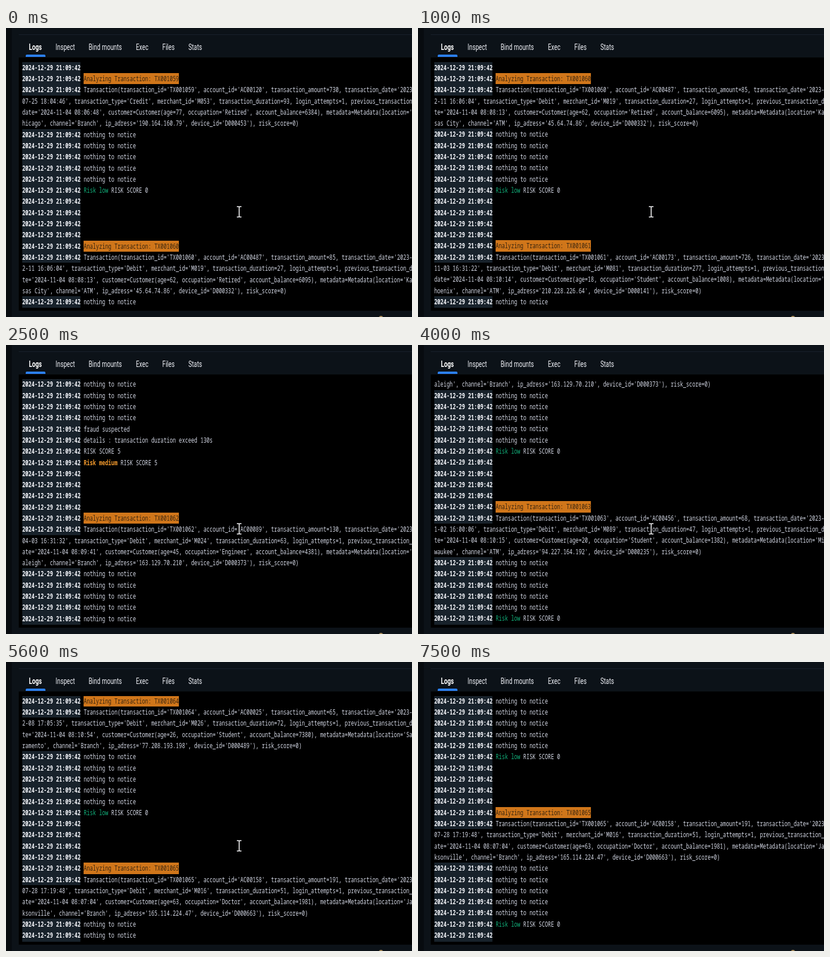
These frames come from a looping animation (700 by 500 pixels, 7.6 s). An HTML page:

```html
<!DOCTYPE html>
<html lang="en">
<head>
<meta charset="utf-8">
<title>Container logs</title>
<style>
  html, body { margin: 0; width: 100%; height: 100%; overflow: hidden; background: #0c1218; }
  #stage { position: relative; width: 700px; height: 500px; overflow: hidden; background: #0c1218; }
  #stage > * { position: absolute; }
  .edge { left: 0; top: 0; width: 10px; height: 500px; background: #070b0f; }
  .rule { left: 22px; top: 11px; width: 678px; height: 1px; background: #18212b; }
  .pane { left: 22px; top: 51px; width: 678px; height: 438px; background: #000; }
  .mark { left: 33.5px; top: 46px; width: 34.5px; height: 4px; border-radius: 2px 2px 0 0; background: #2c80f4; }
  .dot { left: 643px; top: 498px; width: 7px; height: 6px; border-radius: 50%; background: #a88c58; }

  /* The whole interface is shown horizontally condensed */
  #ui { --sx: .679; left: 0; top: 0; width: calc(700px / var(--sx)); height: 500px;
        transform: scaleX(var(--sx)); transform-origin: 0 0; }
  #ui > * { position: absolute; }
  .tab { top: 23px; left: calc(var(--x) * 1px / var(--sx)); white-space: pre;
         font: 400 15px/20px Roboto, sans-serif; color: #f0f2f8; }
  .tab.on { font-weight: 600; color: #fff; }
  #view { left: calc(28px / var(--sx)); top: 58.9px; width: calc(672px / var(--sx)); height: 424.82px; overflow: hidden; }
  #log { position: relative; font: 500 13px/19.31px "Noto Sans Mono", monospace; color: #d3d7e4; }
  .row { height: 19.31px; white-space: pre; }
  .row span { display: inline-block; height: 19.31px; vertical-align: top; }
  .row .time { background: #18222b; color: #f8f9fe; font-weight: 600; }
  .row .head { background: #d0761a; color: #35230f; }
  .low { color: #12b27c; }
  .medium { color: #f0982c; font-weight: 600; }
  #beam { left: 396px; top: 306px; }
</style>
</head>
<body>
<div id="stage">
  <div class="edge"></div>
  <div class="rule"></div>
  <div class="pane"></div>
  <div class="mark"></div>
  <div class="dot"></div>
  <div id="ui">
    <div class="tab on" style="--x:39.5">Logs</div>
    <div class="tab" style="--x:85.5">Inspect</div>
    <div class="tab" style="--x:142.5">Bind mounts</div>
    <div class="tab" style="--x:224">Exec</div>
    <div class="tab" style="--x:269.5">Files</div>
    <div class="tab" style="--x:314.5">Stats</div>
    <div id="view"><div id="log"></div></div>
  </div>
  <svg id="beam" width="12" height="24" fill="none">
    <defs><path id="bar" d="M2 3H5L6 4L7 3H10M6 4V20M2 21H5L6 20L7 21H10"/></defs>
    <use href="#bar" stroke="#000" stroke-width="3.6"/>
    <use href="#bar" stroke="#f4f4f6" stroke-width="1.6"/>
  </svg>
</div>
<script>
  const LOOP = 7600, STEP = 100, COLS = 128, VISIBLE = 22, LINE = 19.31;
  const BEAM_END = 6500;
  const STAMP = '2024-12-29 21:09:42';

  // account | amount | date | type | merchant | duration | previous | age | job | balance | city | channel | ip | device
  const records = [
    'AC00120|730|2023-07-25 18:04:46|Credit|M053|93|08:06:48|77|Retired|6384|Chicago|Branch|190.164.160.79|D000453',
    'AC00487|85|2023-12-11 16:06:04|Debit|M019|27|08:08:13|62|Retired|6095|Kansas City|ATM|45.64.74.86|D000332',
    'AC00173|726|2023-11-03 16:31:22|Debit|M081|277|08:10:14|18|Student|1008|Phoenix|ATM|210.228.226.64|D000141',
    'AC00089|130|2023-04-03 16:31:32|Debit|M024|63|08:09:41|45|Engineer|4381|Raleigh|Branch|163.129.70.210|D000373',
    'AC00456|68|2023-11-02 16:00:06|Debit|M089|47|08:10:15|20|Student|1382|Milwaukee|ATM|94.227.164.192|D000235',
    'AC00025|65|2023-12-08 17:05:35|Debit|M026|72|08:10:54|26|Student|7380|Sacramento|Branch|77.208.193.198|D000489',
    'AC00158|191|2023-07-28 17:19:48|Debit|M016|51|08:07:04|63|Doctor|1981|Jacksonville|Branch|165.114.224.47|D000663'
  ];

  // Rows written so far at given times
  const progress = [[0, 22], [1000, 37], [2500, 58], [4000, 74], [4700, 89], [5600, 100], [6400, 105]];

  const rows = [];
  const time = `<span class="time">${STAMP}</span> `;
  const tag = (cls, text) => `<span class="${cls}">${text}</span>`;
  const put = html => rows.push({ html: time + html, whole: true });

  function putWrapped(text) {
    const full = `${STAMP} ${text}`;
    for (let i = 0; i < full.length; i += COLS) {
      const part = full.slice(i, i + COLS);
      rows.push({
        html: i ? part : time + part.slice(STAMP.length + 1),
        whole: i + COLS >= full.length
      });
    }
  }

  function putTransaction(record, i) {
    const id = 'TX00' + (1059 + i);
    const [account, amount, date, type, merchant, duration, previous, age, job,
           balance, city, channel, ip, device] = record.split('|');
    const slow = duration > 130;
    put(tag('head', `Analyzing Transaction: ${id}`));
    putWrapped(`Transaction(transaction_id='${id}', account_id='${account}', transaction_amount=${amount}, ` +
      `transaction_date='${date}', transaction_type='${type}', merchant_id='${merchant}', ` +
      `transaction_duration=${duration}, login_attempts=1, previous_transaction_date='2024-11-04 ${previous}', ` +
      `customer=Customer(age=${age}, occupation='${job}', account_balance=${balance}), ` +
      `metadata=Metadata(location='${city}', channel='${channel}', ip_adress='${ip}', ` +
      `device_id='${device}'), risk_score=0)`);
    for (let k = 0; k < 4; k++) put('nothing to notice');
    if (slow) {
      ['fraud suspected', 'details : transaction duration exceed 130s', 'RISK SCORE 5'].forEach(put);
      put(tag('medium', 'Risk medium') + ' RISK SCORE 5');
    } else {
      put('nothing to notice');
      put(tag('low', 'Risk low') + ' RISK SCORE 0');
    }
    for (let k = 0; k < 4; k++) put('');
  }

  put('');
  records.forEach(putTransaction);

  const log = document.getElementById('log');
  const beam = document.getElementById('beam');
  log.innerHTML = rows.map(r => `<div class="row">${r.html}</div>`).join('');

  function rowsAt(t) {
    const next = progress.findIndex(p => p[0] > t);
    if (next < 0) return progress[progress.length - 1][1];
    const [t0, n0] = progress[next - 1], [t1, n1] = progress[next];
    let n = Math.floor(n0 + (n1 - n0) * (t - t0) / (t1 - t0));
    while (!rows[n - 1].whole) n--;   // a wrapped message arrives at once
    return n;
  }

  function draw(now) {
    const t = Math.floor((now % LOOP) / STEP) * STEP;
    log.style.top = -(rowsAt(t) - VISIBLE) * LINE + 'px';
    beam.style.visibility = t < BEAM_END ? 'visible' : 'hidden';
  }

  const start = performance.now();
  function tick() {
    draw(performance.now() - start);
    requestAnimationFrame(tick);
  }
  tick();
</script>
</body>
</html>
```
